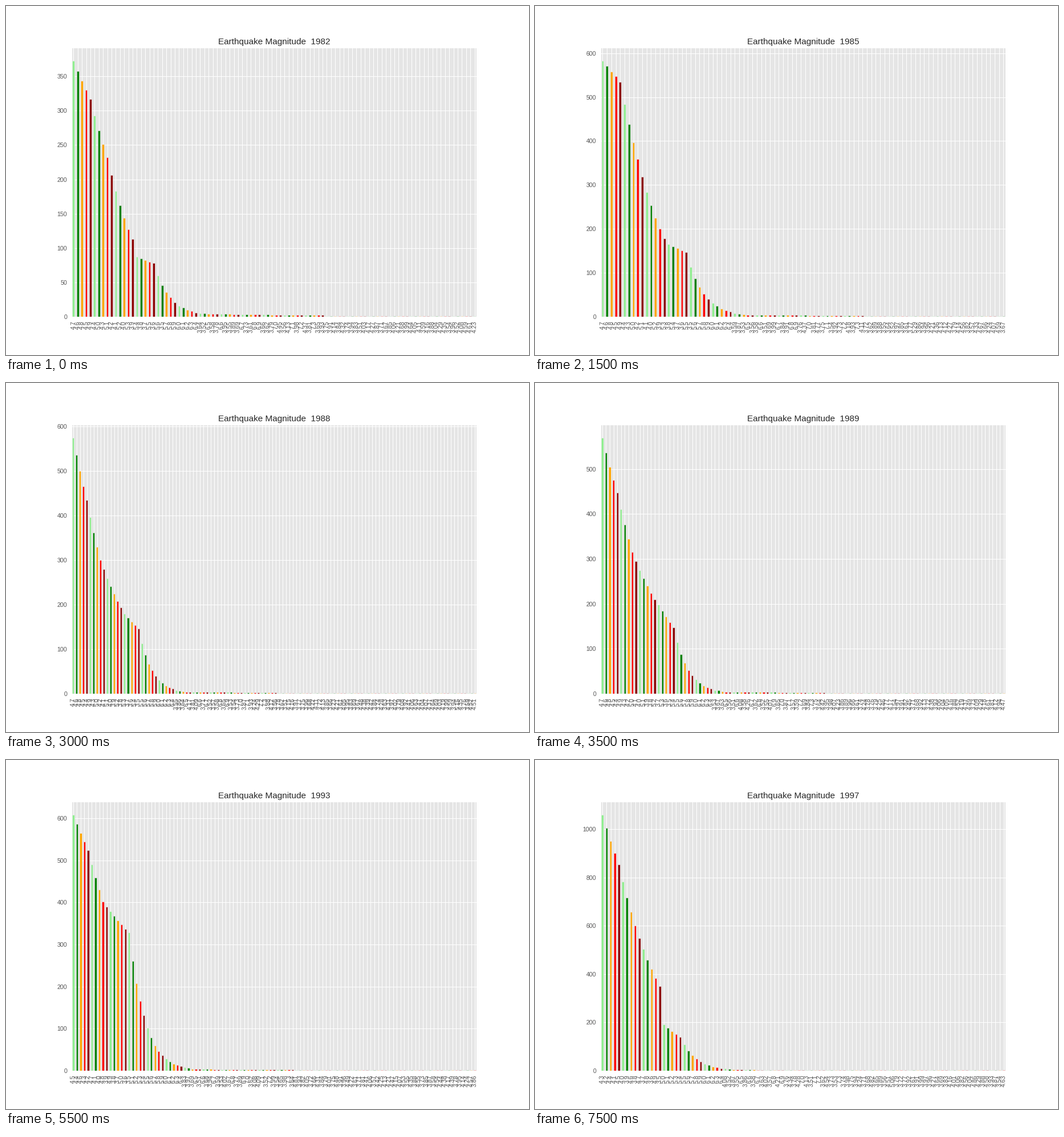
Animation of 917 by 611 pixels, one loop 8 s. Source, as a matplotlib script:

```python
import random

import matplotlib.pyplot as plt
import numpy as np
from matplotlib.animation import FuncAnimation

DPI = 80
PT = 72 / DPI  # points per pixel
FIRST_YEAR, FRAMES, INTERVAL = 1982, 16, 500
COLORS = ["lightgreen", "green", "orange", "red", "darkred"]

# Key points: number of bars, then the heights at a few ranks.
KEY_RANKS = [1, 5, 9, 15, 16, 20]
KEYS = {
    1982: (96, 373, 317, 232, 113, 87, 78),
    1985: (92, 583, 535, 359, 178, 165, 147),
    1988: (118, 575, 435, 300, 193, 180, 146),
    1991: (87, 559, 472, 346, 242, 234, 150),
    1993: (109, 609, 525, 402, 337, 329, 131),
    1995: (99, 1065, 925, 654, 361, 210, 138),
    1997: (99, 1061, 855, 602, 351, 192, 140),
}


def bar_heights(year):
    """Descending counts: smooth head, steep decay, then a long thin tail."""
    total, *head = [np.interp(year, list(KEYS), col) for col in zip(*KEYS.values())]
    rank = np.arange(1, round(total) + 1)
    head_curve = np.exp(np.interp(rank, KEY_RANKS, np.log(head)))
    decay = head[-1] * np.exp(-0.26 * (rank - 20))
    thin = 5 * np.exp(-(rank - 30) / 25)
    tail = np.maximum(np.maximum(decay, thin), 1)
    return np.rint(np.where(rank <= 20, head_curve, tail))


def bar_labels(year, size):
    """Magnitudes by distance from the year's most common one, then rare ones."""
    rng = random.Random(year)
    peak = np.interp(year, [1991, 1995], [4.71, 4.28])
    low_side = np.interp(year, [1982, 1988, 1991, 1995], [0.78, 0.6, 0.4, 0.8])

    def rarity(m):
        return m - peak if m > peak else low_side * (peak - m)

    common = sorted((m / 10 for m in range(35, 65)), key=rarity)
    large = [m / 10 for m in range(65, 74)]
    fine = [m / 100 for m in range(351, 540) if m % 10]
    fine.sort(key=lambda m: m + rng.gauss(0, 0.4))
    rare = fine[:size - len(common) - len(large)]
    for i, m in enumerate(large):
        rare.insert(2 + 3 * i + rng.randrange(3), m)
    return [str(m) for m in common + rare]


plt.rcParams.update({
    "font.family": "Liberation Sans",
    "font.size": 10.61 * PT,
    "text.color": "#262626",
    "axes.titlesize": 15.28 * PT,
    "axes.titlepad": 6.4 * PT,
    "axes.facecolor": "#E5E5E5",
    "axes.edgecolor": "white",
    "axes.linewidth": 1.06 * PT,
    "axes.axisbelow": True,
    "axes.grid": True,
    "grid.color": "white",
    "grid.linewidth": 1.06 * PT,
    "xtick.color": "#555555",
    "ytick.color": "#555555",
    "xtick.major.size": 0,
    "ytick.major.size": 0,
    "xtick.major.pad": 7.43 * PT,
    "ytick.major.pad": 7.43 * PT,
})

fig = plt.figure(figsize=(917 / DPI, 611 / DPI), dpi=DPI, facecolor="white")
ax = fig.add_axes([0.125, 0.11, 0.775, 0.77])


def draw(frame):
    year = FIRST_YEAR + frame
    heights = bar_heights(year)
    n = len(heights)
    ax.clear()
    ax.bar(range(n), heights, width=0.5,
           color=[COLORS[i % len(COLORS)] for i in range(n)],
           edgecolor="#EEEEEE", linewidth=0.53 * PT)
    ax.set_xlim(-0.5, n - 0.5)
    ax.set_ylim(0, 1.05 * heights.max())
    ax.set_xticks(range(n), bar_labels(year, n), rotation=90)
    ax.set_title(f"Earthquake Magnitude  {year}")
    return []


anim = FuncAnimation(fig, draw, frames=FRAMES, init_func=lambda: [],
                     interval=INTERVAL, repeat=True, repeat_delay=0)
plt.show()
```
